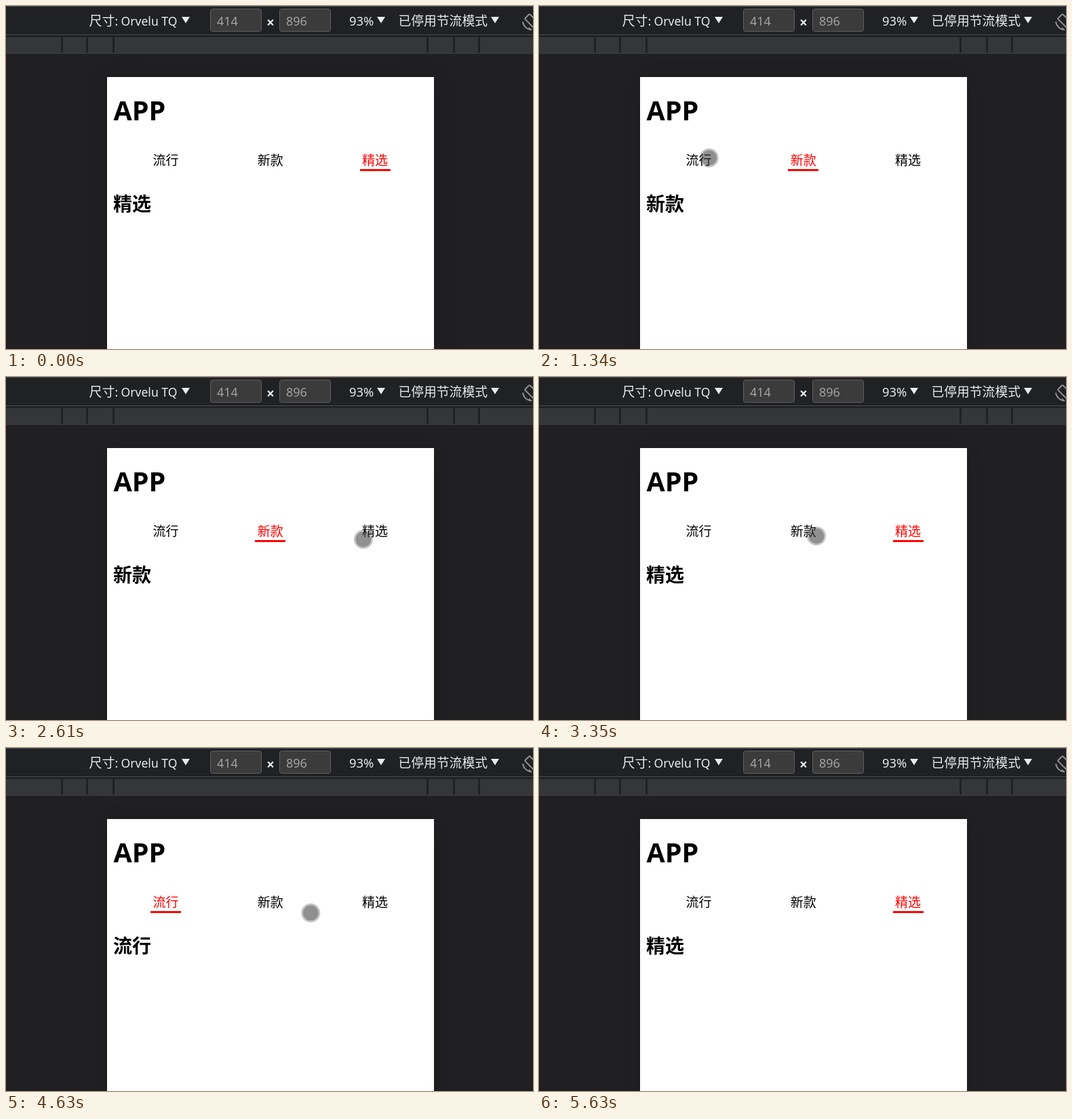
Animation of 777x507 px, one loop 6030 ms. Source, as an HTML page with a canvas:

```html
<!DOCTYPE html>
<html lang="zh-CN">
<head>
<meta charset="utf-8">
<title>APP</title>
<style>
  html, body { margin: 0; width: 100%; height: 100%; overflow: hidden; background: #202124; }
  canvas { display: block; width: 777px; height: 507px; }
</style>
</head>
<body>
<canvas id="stage" width="777" height="507"></canvas>
<script>
const ctx = document.getElementById('stage').getContext('2d');
const LOOP = 6030;
const STEP = 67;
const HOLD = 130;
const LATIN = '"Noto Sans", "Open Sans", sans-serif';
const CJK = '"Noto Sans CJK SC", "Noto Sans CJK", sans-serif';
const LIGHT = '#e8eaed';

const tabs = ['流行', '新款', '精选'];
const tabX = i => 216.5 + i * 154.3;

const smooth = u => u * u * (3 - 2 * u);
const easeOut = u => u * (2 - u);
const easeIn = u => u * u;

// A tab is selected HOLD ms after its press.
const clicks = [
  { at: 820, tab: 1 },
  { at: 1730, tab: 0 },
  { at: 2340, tab: 1 },
  { at: 3010, tab: 2 },
  { at: 3420, tab: 1 },
  { at: 4290, tab: 0 },
  { at: 4960, tab: 2 },
];

const entry = { x: 687, y: 484 };
const glides = [
  { from: 165, to: 590, x: 335, y: 240, ease: easeOut },
  { from: 590, to: 730, x: 375, y: 229 },
  { from: 1020, to: 1420, x: 234, y: 224 },
  { from: 1890, to: 2180, x: 399, y: 236 },
  { from: 2400, to: 2610, x: 527, y: 240 },
  { from: 3090, to: 3345, x: 409, y: 235 },
  { from: 3580, to: 4020, x: 261, y: 236 },
  { from: 4430, to: 4700, x: 504, y: 246 },
  { from: 5110, to: 5555, x: 764, y: 515, ease: easeIn },
];

function rect(x, y, w, h, color) {
  ctx.fillStyle = color;
  ctx.fillRect(x, y, w, h);
}

function text(str, x, y, size, color, family = LATIN, weight = 400) {
  ctx.font = `${weight} ${size}px ${family}`;
  ctx.fillStyle = color;
  ctx.fillText(str, x, y);
}

function disc(x, y, r, fill) {
  ctx.fillStyle = fill;
  ctx.beginPath();
  ctx.arc(x, y, r, 0, Math.PI * 2);
  ctx.fill();
}

function arrow(x) {
  ctx.fillStyle = LIGHT;
  ctx.beginPath();
  ctx.moveTo(x, 16);
  ctx.lineTo(x + 12, 16);
  ctx.lineTo(x + 6, 25.5);
  ctx.fill();
}

function sizeField(x, value) {
  ctx.beginPath();
  ctx.roundRect(x + 0.5, 4.5, 75, 33, 3);
  ctx.fillStyle = '#3b3b3b';
  ctx.fill();
  ctx.strokeStyle = '#5f5f5f';
  ctx.lineWidth = 1;
  ctx.stroke();
  text(value, x + 10, 29, 18, '#a2a2a2');
}

function rotateIcon() {
  ctx.save();
  ctx.translate(775, 22);
  ctx.strokeStyle = ctx.fillStyle = '#919191';
  ctx.lineWidth = 2;
  ctx.beginPath();
  ctx.arc(0, 0, 13, Math.PI * 0.5, Math.PI * 0.97);
  ctx.stroke();
  ctx.beginPath();
  ctx.moveTo(1, 14);
  ctx.lineTo(-5, 11);
  ctx.lineTo(-3.5, 9.5);
  ctx.fill();
  ctx.rotate(-Math.PI / 4);
  ctx.beginPath();
  ctx.roundRect(-5, -9.5, 10, 19, 1.5);
  ctx.stroke();
  ctx.restore();
}

function drawToolbar() {
  rect(0, 0, 777, 507, '#202022');
  rect(0, 0, 777, 46, '#202124');
  rect(0, 0, 777, 1, '#4b525c');
  rect(0, 42, 777, 1, '#494c50');
  rect(0, 46, 777, 25, '#35363a');
  // Separators mirror each other around the page centre.
  for (const offset of [231, 270, 307]) {
    rect(388 - offset, 46, 3, 23, '#202124');
    rect(389 + offset, 46, 3, 23, '#202124');
  }

  text('尺寸', 122.5, 29, 19, LIGHT, CJK);
  text(':', 160.5, 29, 18, LIGHT);
  text('Orvelu TQ', 169.5, 29, 17.6, LIGHT);
  arrow(259);
  sizeField(301, '414');
  text('×', 384, 31.5, 21, LIGHT, LATIN, 600);
  sizeField(403, '896');
  text('93%', 506, 29, 18.4, LIGHT);
  arrow(547);
  text('已停用节流模式', 578.5, 29, 18.8, LIGHT, CJK);
  arrow(715);
  rotateIcon();
}

function drawPage(selected) {
  ctx.shadowColor = 'rgba(0,0,0,0.12)';
  ctx.shadowBlur = 36;
  rect(149, 105, 482, 440, '#fff');
  ctx.shadowColor = 'transparent';

  text('APP', 158.5, 169, 39.5, '#000', LATIN, 700);
  tabs.forEach((label, i) => {
    text(label, tabX(i), 234.5, 19, i === selected ? '#f00' : '#000', CJK);
  });
  rect(Math.round(tabX(selected) - 3.5), 241, 45, 3, '#f00');
  text(tabs[selected], 158, 303, 28, '#000', CJK, 700);
}

function pointerAt(t) {
  let { x, y } = entry;
  for (const { from, to, x: endX, y: endY, ease = smooth } of glides) {
    const k = ease(Math.min(1, Math.max(0, (t - from) / (to - from))));
    x += (endX - x) * k;
    y += (endY - y) * k;
  }
  return [x, y];
}

function drawPointer(t) {
  // The pointer moves in visible steps.
  const [x, y] = pointerAt(Math.floor((t + 6) / STEP) * STEP - 6);
  disc(x, y, 14, 'rgba(60,60,60,0.3)');
  if (clicks.some(({ at }) => t >= at && t < at + HOLD)) {
    const glow = ctx.createRadialGradient(x, y, 3, x, y, 13);
    glow.addColorStop(0, 'rgba(50,50,50,0.8)');
    glow.addColorStop(0.5, 'rgba(60,60,60,0.55)');
    glow.addColorStop(1, 'rgba(60,60,60,0.08)');
    disc(x, y, 13, glow);
  } else {
    disc(x, y, 11.3, 'rgba(60,60,60,0.38)');
  }
}

function draw() {
  const t = performance.now() % LOOP;
  const last = clicks.filter(({ at }) => at + HOLD <= t).pop();
  drawToolbar();
  drawPage(last ? last.tab : 2);
  if (t >= 180 && t < 5630) drawPointer(t);
  requestAnimationFrame(draw);
}

draw();
</script>
</body>
</html>
```
